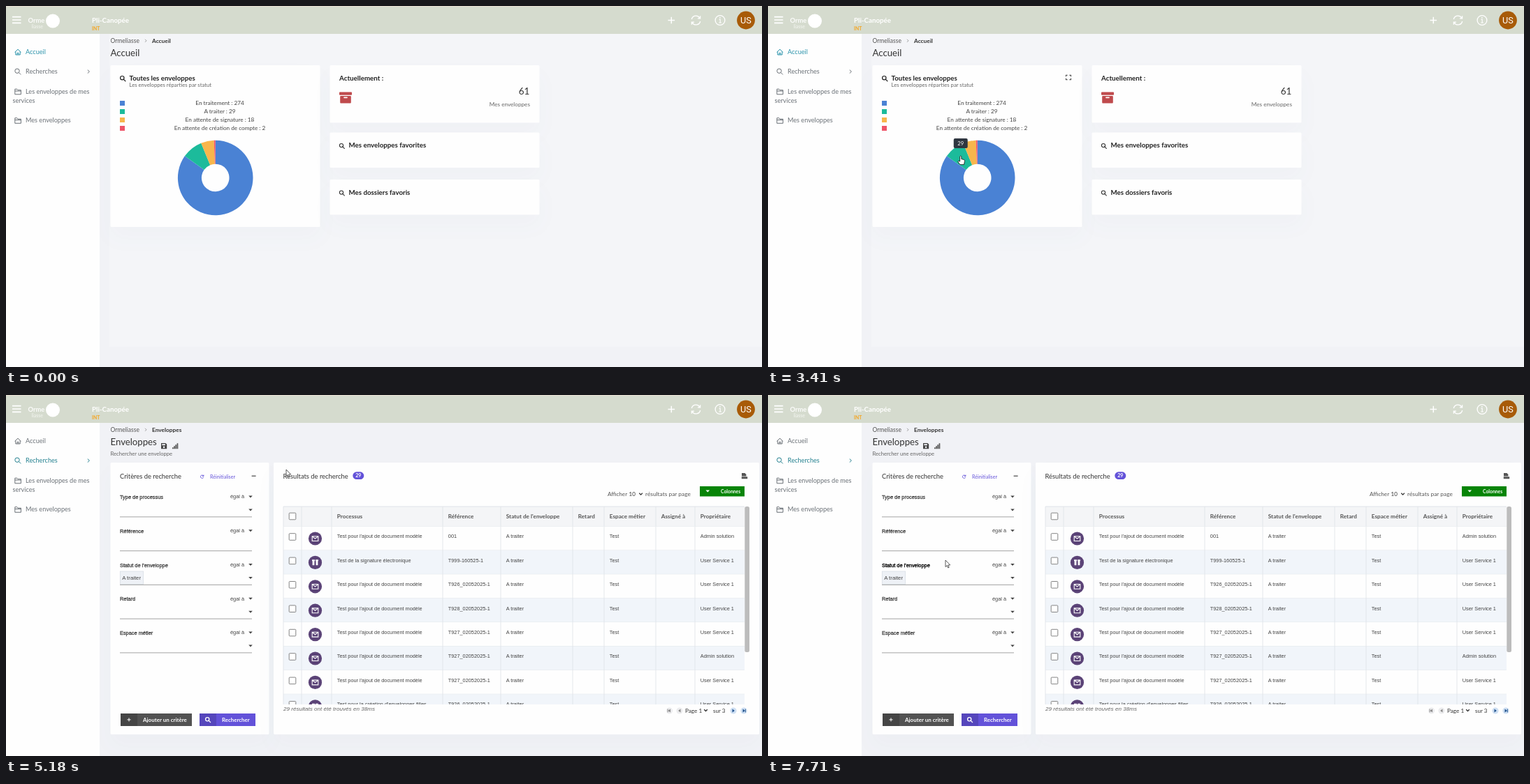
Recreate the animation shown at these times as an HTML page. Size 1082 px wide and 518 px high, loop 8000 ms.

```html
<!DOCTYPE html>
<html lang="fr">
<head>
<meta charset="utf-8">
<title>Accueil</title>
<style>
html, body { margin: 0; width: 100%; height: 100%; overflow: hidden; background: #f1f2f6; }
svg { display: block; width: 100%; height: 100%; }
text { font-family: Lato, sans-serif; fill: #555; white-space: pre; }
.b { font-weight: 700; }
.a { font-family: "Liberation Sans", Arial, sans-serif; }
.r { font-family: Roboto, sans-serif; }
.nav { fill: none; stroke: currentColor; color: #6b7177; }
.nav text { fill: currentColor; stroke: none; }
.card { fill: #fefefe; filter: drop-shadow(0 16px 14px rgba(60, 70, 110, .025)); }
.label { stroke-width: .3; }
</style>
</head>
<body>
<svg id="stage" viewBox="0 0 1082 518"></svg>
<script>
const LOOP = 8000;
const VIOLET = '#6352d9';
const COLORS = ['#4a82d4', '#1cbb9b', '#f8b64c', '#ee5468'];
const COUNTS = [274, 29, 18, 2];
const TOTAL = COUNTS.reduce((a, b) => a + b);
const PIE = { x: 299.7, y: 246.5, outer: 53.8, inner: 19.8 };
const FIELDS = ['Type de processus', 'Référence', "Statut de l'enveloppe", 'Retard', 'Espace métier'];
const COLS = [397, 423, 466, 625, 708, 811, 856, 930, 986, 1057];
const HEADS = ['Processus', 'Référence', "Statut de l'enveloppe", 'Retard', 'Espace métier', 'Assigné à', 'Propriétaire'];
const REFS = ['001', 'T999-160525-1', ...[926, 928, 927, 927, 927, 926].map(n => `T${n}_02052025-1`)];
const ROW_TOP = 188.5, ROW_H = 34.4;
const FIELD_TOP = 137, FIELD_H = 48.75;

const text = (x, y, str, size, fill = '#555', cls = '', extra = '') =>
  `<text x="${x}" y="${y}" font-size="${size}" class="${cls}" style="fill:${fill}" ${extra}>${str}</text>`;
const rect = (x, y, w, h, fill, extra = '') =>
  `<rect x="${x}" y="${y}" width="${w}" height="${h}" fill="${fill}" ${extra}/>`;
const line = (d, stroke, w = 1, extra = '') =>
  `<path d="${d}" fill="none" stroke="${stroke}" stroke-width="${w}" ${extra}/>`;
const shape = (d, fill, extra = '') => `<path d="${d}" fill="${fill}" ${extra}/>`;
const disc = (x, y, r, fill, extra = '') => `<circle cx="${x}" cy="${y}" r="${r}" fill="${fill}" ${extra}/>`;
const card = (x, y, w, h) => rect(x, y, w, h, '#fefefe', 'class="card" rx="1.5"');
const caret = (x, y, fill = '#444') => shape(`M${x - 2.8} ${y - 1.4}h5.6l-2.8 3z`, fill);
const lens = (x, y, r, color, w) =>
  disc(x, y, r, 'none', `stroke="${color}" stroke-width="${w}"`) +
  line(`M${x + r * .7} ${y + r * .7}l${r} ${r}`, color, w, 'stroke-linecap="round"');
const group = (id, body, extra = '') => `<g id="${id}" ${extra}>${body}</g>`;
const range = (n, fn) => Array.from({ length: n }, (_, i) => fn(i)).join('');

function slice(i) {
  const before = COUNTS.slice(0, i).reduce((a, b) => a + b, 0);
  const point = (n, r) => {
    const a = n / TOTAL * Math.PI * 2;
    return `${PIE.x + r * Math.sin(a)} ${PIE.y - r * Math.cos(a)}`;
  };
  const end = before + COUNTS[i], big = COUNTS[i] > TOTAL / 2 ? 1 : 0;
  return shape(`M${point(before, PIE.outer)}A${PIE.outer} ${PIE.outer} 0 ${big} 1 ${point(end, PIE.outer)}` +
    `L${point(end, PIE.inner)}A${PIE.inner} ${PIE.inner} 0 ${big} 0 ${point(before, PIE.inner)}Z`, COLORS[i]);
}

function header() {
  return rect(0, 0, 1082, 40, '#d5dbce') + rect(0, 0, 1082, 1, '#e9e0d3') +
    line('M9 15.7h12.5M9 20h12.5M9 24.3h12.5', '#fff', 1.7) +
    text(31.5, 23.5, 'Orme', 9.4, '#fff', 'b', 'opacity=".9"') + text(36.5, 31.5, 'liasse', 7, '#f4f6f1') +
    disc(67, 21.5, 10, '#fff') +
    text(123, 24, 'Pli-Canopée', 9.75, '#fff', 'b') + text(123, 35.3, 'INT', 6.8, '#f5a623', 'b') +
    line('M952.3 15.7v9.6M947.5 20.5h9.6', '#fff', 1.5) +
    line('M981.3 19a6.3 6.3 0 0 1 11.6 -1.8M993.7 22a6.3 6.3 0 0 1 -11.6 1.8M993.6 14.2v3.6h-3.6M981.4 26.8v-3.6h3.6', '#fff', 1.3) +
    disc(1022, 20.5, 6.9, 'none', 'stroke="#fff" stroke-width="1.3"') +
    line('M1020.6 19.4h1.6v4.6M1020.3 24h3.6', '#fff', 1.1) + disc(1021.9, 16.8, .9, '#fff') +
    disc(1059, 20.5, 12.9, '#a85b08') + text(1059, 25, 'US', 12.7, '#fff', 'r', 'text-anchor="middle"');
}

function sidebar() {
  const folder = y => `<path d="M12.8 ${y + 3.8}v-7.6h3l1.2 1.5h4.4v6.1zM12.8 ${y - 1}h8.6"/>`;
  const label = (x, y, s) => `<text x="${x}" y="${y}" font-size="9.1">${s}</text>`;
  return rect(0, 40, 134, 478, '#fefefe') +
    group('navHome', '<path d="M12.6 66.4l4.4-4.2 4.4 4.2M13.8 65.4v4.6h6.4v-4.6M16 70v-2.6h2v2.6"/>' + label(28, 69, 'Accueil'), 'class="nav"') +
    group('navSearch', '<circle cx="16" cy="93.2" r="3.2"/><path d="M18.4 95.6l2.8 2.8"/>' + label(28, 97.3, 'Recherches') +
      '<path d="M116.8 91.6l2.6 2.5-2.6 2.5"/>', 'class="nav"') +
    '<g class="nav">' + folder(123) + label(28, 125.7, 'Les enveloppes de mes') + label(9.5, 138.6, 'services') +
    folder(164.5) + label(28, 167, 'Mes enveloppes') + '</g>';
}

const crumbs = (page, base) => text(149.5, 53.2, 'Ormeliasse', 8.5, '#555') +
  line('M199 47.8l2 2-2 2', '#888', .8) + text(209, 53.4, page, 8.3, '#333', 'b') +
  text(149.5, base, page, 13.2, '#333');

function home() {
  const favorites = (y, s) => card(463.5, y, 300, 50.5) + lens(480, y + 18.6, 2.6, '#333', 1.1) +
    text(490.5, y + 21.8, s, 9.75, '#222', 'b');
  const legend = ['En traitement', 'A traiter', 'En attente de signature', 'En attente de création de compte'];
  return rect(148, 40, 934, 449, '#f4f5f8') + crumbs('Accueil', 72.4) +
    card(149.5, 85, 300, 232) + lens(166.3, 103.2, 2.7, '#222', 1.2) +
    text(176.5, 106.8, 'Toutes les enveloppes', 9.7, '#222', 'b') +
    text(176.5, 116, 'Les enveloppes réparties par statut', 7.7, '#666') +
    range(4, i => rect(163, 136 + 12 * i, 7, 7, COLORS[i]) +
      text(306, 142 + 11.9 * i, `${legend[i]} : ${COUNTS[i]}`, 8.2, '#444', '', 'text-anchor="middle"')) +
    range(4, slice) +
    group('expand', line('M426.5 101.2v-2h2.2M431.3 99.2h2.2v2M433.5 103.8v2h-2.2M428.7 105.8h-2.2v-2', '#444', 1.1)) +
    card(463.5, 85, 300, 82.5) + text(477, 107, 'Actuellement :', 9.8, '#222', 'b') +
    rect(477, 123.5, 18, 4.3, '#bf4a4c', 'rx=".8"') + rect(478.2, 129, 15.6, 10.5, '#bf4a4c', 'rx="1"') +
    rect(483.2, 130.6, 5.6, 1.6, '#fefefe', 'rx=".8"') +
    text(749.5, 126.7, '61', 13.6, '#333', '', 'text-anchor="end"') +
    text(750, 143.7, 'Mes enveloppes', 8.2, '#666', '', 'text-anchor="end"') +
    favorites(181.5, 'Mes enveloppes favorites') + favorites(249, 'Mes dossiers favoris');
}

function form() {
  const field = (name, i) => {
    const y = 149 + FIELD_H * i;
    return text(163, y, name, 7.4, 'inherit', 'a label field') + text(321, y - .7, 'égal à', 7.4, '#444', 'a') +
      caret(350, y - 3) + (i === 1 ? '' : caret(350, y + 16)) + line(`M163 ${y + 25.9}h189`, '#999', .9);
  };
  return text(149.5, 87, 'Rechercher une enveloppe', 7.6, '#666') +
    shape('M222 69h6.4l1.8 1.8v6.4h-8.2zM223.3 70.2v2h4.6v-2zM226 73.6a1.3 1.3 0 1 0 .1 0z', '#444', 'fill-rule="evenodd"') +
    shape('M238 77.2v-2h1.7v2zM240.2 77.2v-4h1.7v4zM242.4 77.2v-6h1.7v6zM244.6 77.2v-8h1.7v8z', '#555') +
    card(149.5, 97, 227, 390) + card(383, 97, 695, 390) +
    text(163, 120.3, 'Critères de recherche', 9.35, '#333') + text(396.5, 120.3, 'Résultats de recherche', 9.4, '#333') +
    line('M282.6 116.2a2.2 2.2 0 1 0 .1 1.8M282.9 114.6v1.9h-1.9', VIOLET, .9) +
    text(292, 120.2, 'Réinitialiser', 7.1, VIOLET) + line('M351.6 116.2h6', '#333', 1.1) +
    rect(163.3, 253, 33.4, 18.3, '#eef1f6', 'stroke="#d5dae2" stroke-width=".7"') +
    text(166.2, 265.2, 'A traiter', 7.8, '#444', 'a') + FIELDS.map(field).join('') +
    rect(164, 457, 102, 18, '#525252') + rect(164, 457, 24, 18, '#454545') +
    line('M176 463.4v5M173.5 465.9h5', '#fff', 1) + text(196, 469, 'Ajouter un critère', 8, '#fff', 'b') +
    rect(277, 457, 80, 18, VIOLET) + rect(277, 457, 24, 18, '#5546bc') +
    lens(288.2, 465.2, 2.6, '#fff', 1.3) + text(309, 469, 'Rechercher', 7.9, '#fff', 'b');
}

const checkbox = y => rect(405.2, y, 9.6, 9.6, '#fff', 'rx="1" stroke="#777" stroke-width=".9"');

function row(i) {
  const y = ROW_TOP + ROW_H * i, base = y + 16.9;
  const name = i === 1 ? 'Test de la signature électronique'
    : i === 7 ? "Test pour la création d'enveloppes filles" : "Test pour l'ajout de document modèle";
  const cells = [name, REFS[i], 'A traiter', '', 'Test', '', i % 5 ? 'User Service 1' : 'Admin solution'];
  const icon = i === 1 || i === 7
    ? shape(`M438 ${y + 13.4}h4v2h-.6v6h-2.8v-6h-.6zM443 ${y + 13.4}h4v2h-.6v6h-2.8v-6h-.6z`, '#fff')
    : line(`M438.2 ${y + 14.2}h8.6v6.8h-8.6zl4.3 3.4 4.3-3.4`, '#fff', 1.1);
  return rect(397, y, 660, ROW_H, i % 2 ? '#f1f5fa' : '#fefefe', 'class="row"') +
    line(`M397 ${y + ROW_H}h660`, '#dfe3e8', .8) + checkbox(y + 10.2) +
    disc(442.5, y + 17.5, 9.6, '#5b4377') + icon +
    cells.map((s, c) => text(COLS[c + 2] + 7.8, base, s, 7.35, '#444', 'a')).join('');
}

function results() {
  const grid = (y, h) => COLS.slice(0, -1).map(x => line(`M${x} ${y}v${h}`, '#dfe3e8', .8)).join('');
  const pager = (x, on, dir, bar) => disc(x, 453, 4.6, on ? '#cfe0f3' : '#ececee') +
    shape(`M${x - 1.5 * dir} 450.5v5l${3.4 * dir} -2.5z`, on ? '#24558f' : '#8a8a8a') +
    (bar ? line(`M${x + 2.3 * dir} 450.6v4.8`, on ? '#24558f' : '#8a8a8a', 1) : '');
  const chevron = (x, y) => line(`M${x - 2.3} ${y - 1.2}l2.3 2.3 2.3-2.3`, '#333', 1.3);
  return group('heading', rect(496.3, 110.3, 16, 10.8, VIOLET, 'rx="5.4"') +
      text(504.3, 118.3, '29', 7, '#fff', 'b', 'text-anchor="middle"') +
      shape('M1053 112h4.4l2 2v2.4h-6.4zM1052.8 117.3h8.4v3h-8.4z', '#555') +
      text(861, 144.8, 'Afficher', 8.1) + text(891.5, 144.8, '10', 8, '#333') + chevron(908.6, 142) +
      text(915, 144.8, 'résultats par page', 8.4) +
      rect(993, 131, 64, 14.5, '#078407') + caret(1004.3, 138, '#fff') + text(1023, 140.8, 'Colonnes', 6.8, '#fff', 'b') +
      rect(397, 160, 660, 28.5, '#f4f5f7') + line('M397 160h660M397 188.5h660', '#d9dde2', .8) + grid(160, 28.5) +
      checkbox(169.2) + HEADS.map((s, c) => text(COLS[c + 2] + 7.8, 176.6, s, 8.2, '#555', 'b')).join('')) +
    group('rows', range(8, row) + grid(188.5, 256), 'clip-path="url(#body)"') +
    group('footer', rect(1057.3, 160, 6.7, 209, '#bcbcbc', 'rx="2.5"') +
      text(397, 453, '29 résultats ont été trouvés en 38ms', 8.1, '#666', 'a', 'font-style="italic"') +
      pager(949.5, 0, -1, 1) + pager(964, 0, -1) + text(972, 455.6, 'Page 1', 8.2, '#333') + chevron(1001.5, 452.4) +
      text(1012, 455.6, 'sur 3', 8, '#333') + pager(1041, 1, 1) + pager(1056, 1, 1, 1));
}

const cursors =
  group('ring', disc(0, 0, 8, '#fff', 'opacity=".35"')) +
  group('arrow', shape('M0 0V9.6L2.2 7.6 3.7 11 5.2 10.3 3.7 7H6.7Z', '#fff', 'stroke="#333" stroke-width=".8"')) +
  group('hand', shape('M-1.1.9Q0-.7 1.1.9V4.6L4.6 5.4Q6 5.8 5.8 7.4L4.8 12.6H-1L-4 8.1Q-3.6 6.6-1.1 8Z', '#fff', 'stroke="#222" stroke-width=".9"')) +
  group('beam', line('M-2-4.2Q-.2-4.4 0-3.4Q.2-4.4 2-4.2M0-3.6V3.6M-2 4.2Q-.2 4.4 0 3.4Q.2 4.4 2 4.2', '#333', .9));

const stage = document.getElementById('stage');
stage.innerHTML = '<clipPath id="body"><rect x="396" y="188" width="662" height="256"/></clipPath>' +
  rect(0, 0, 1082, 518, '#f1f2f6') + group('home', home()) + group('crumbs', crumbs('Enveloppes', 71.7)) +
  group('form', form()) + results() + sidebar() + header() +
  group('tip', rect(0, -25, 0, 14, '#2f3640', 'rx="2"') + text(0, -15.2, '', 7.6, '#fff', '', 'text-anchor="middle"')) +
  group('cursor', cursors);

const el = id => document.getElementById(id);
const show = (id, on) => { el(id).style.display = on ? '' : 'none'; };
const fields = [...stage.querySelectorAll('.field')];
const rows = [...stage.querySelectorAll('.row')];

// Bursts of movement: start, end, number of steps
const BURSTS = [[660, 1440, 11], [1520, 1920, 6], [2080, 2250, 3], [2540, 2630, 2], [3090, 3090, 1], [3410, 3410, 1],
  [3560, 3960, 6], [4340, 5100, 11], [5180, 5570, 6], [6120, 6430, 5], [6610, 7410, 11], [7480, 7710, 4]];
// Pointer path: time, x, y
const PATH = [[660, 587, 313], [900, 455, 310], [1130, 310, 311], [1300, 231, 301], [1440, 273, 281],
  [1520, 278.5, 266], [1920, 269, 223], [2250, 271.5, 218], [2630, 275.5, 215], [4300, 276, 215],
  [4500, 345, 160], [4740, 610, 66], [4800, 628, 58], [5100, 412, 104],
  [5180, 401, 107], [5260, 408, 97], [5570, 467, 145], [6120, 496, 165], [6195, 537, 192.5], [6430, 556, 203],
  [6610, 545, 206], [6900, 440, 240], [7000, 400, 262], [7410, 248, 284.5], [7480, 250, 284], [7710, 254, 237]];

function snap(t) {
  const burst = BURSTS.filter(b => b[0] <= t).pop();
  if (!burst) return 0;
  const [start, end, n] = burst;
  const step = (end - start) / (n - 1 || 1) || 1;
  return start + Math.min(n - 1, Math.floor((t - start) / step + 1e-6)) * step;
}

function pointer(t) {
  const i = PATH.findIndex(p => p[0] > t);
  if (i <= 0) return i ? PATH[PATH.length - 1].slice(1) : PATH[0].slice(1);
  const [a, b] = [PATH[i - 1], PATH[i]];
  const k = (t - a[0]) / (b[0] - a[0]);
  return [a[1] + (b[1] - a[1]) * k, a[2] + (b[2] - a[2]) * k];
}

function pieValue(x, y) {
  const dx = x - PIE.x, dy = y - PIE.y, r = Math.hypot(dx, dy);
  if (r > PIE.outer || r < PIE.inner) return 0;
  let n = ((Math.atan2(dx, -dy) / Math.PI / 2 + 1) % 1) * TOTAL;
  return COUNTS.find(c => (n -= c) < 0) || 0;
}

function draw(time) {
  const t = snap(time), [x, y] = pointer(t);
  const atHome = t < 3560, inForm = t >= 3640;
  show('home', atHome);
  show('crumbs', !atHome);
  show('form', inForm);
  show('heading', t >= 3800);
  show('rows', t >= 3880);
  show('footer', t >= 3960);
  show('expand', t >= 660 && x < 449.5 && y < 317);
  el('navHome').style.color = atHome ? '#2a93ab' : '';
  el('navSearch').style.color = atHome ? '' : '#23808f';

  const value = atHome && t >= 660 ? pieValue(x, y) : 0;
  show('tip', value);
  if (value) {
    const [box, label] = el('tip').children, w = value > 99 ? 26 : 20;
    box.setAttribute('width', w);
    box.setAttribute('x', -w / 2);
    label.textContent = value;
    el('tip').setAttribute('transform', `translate(${x} ${y})`);
    el('tip').setAttribute('opacity', Math.max(.1, Math.min(1, (t - 1360) / 260)));
  }

  const inField = inForm && x > 163 && x < 353;
  const field = inField ? Math.floor((y - FIELD_TOP) / FIELD_H) : -1;
  fields.forEach((f, i) => { f.style.fill = f.style.stroke = i === field ? '#000' : '#444'; });
  const over = x > 397 && y > ROW_TOP && t > 3960 ? Math.floor((y - ROW_TOP) / ROW_H) : -1;
  rows.forEach((r, i) => r.setAttribute('fill', i === over ? '#ebebeb' : i % 2 ? '#f1f5fa' : '#fefefe'));

  const beam = inField && y > 205 && y < 225;
  show('cursor', t >= 660);
  show('ring', t >= 3090 && t < 3410);
  show('hand', value);
  show('beam', beam);
  show('arrow', !value && !beam);
  el('cursor').setAttribute('transform', `translate(${x} ${y})`);
}

const origin = performance.now();
function tick() {
  draw((performance.now() - origin) % LOOP);
  requestAnimationFrame(tick);
}
tick();
</script>
</body>
</html>
```
